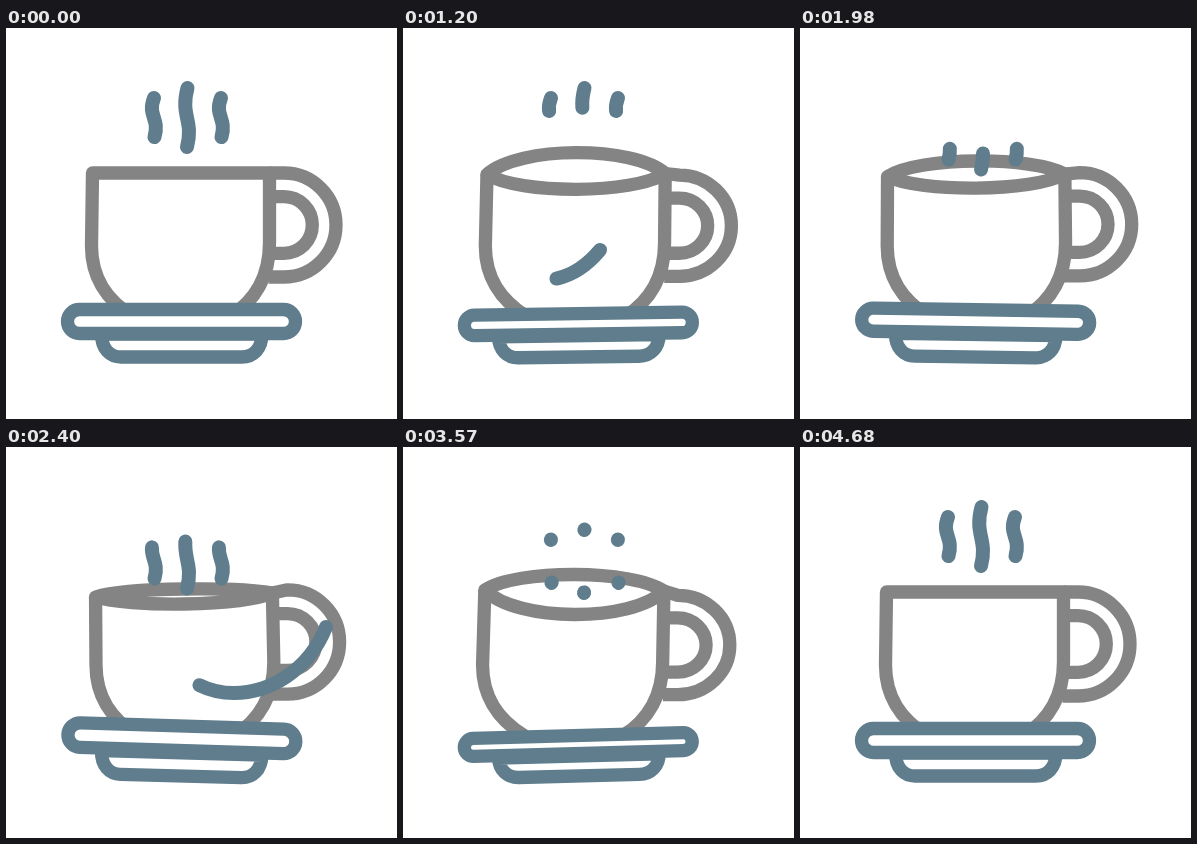
An HTML page with a canvas that plays this animation: 391 by 391 pixels, repeating every 4.8 s.

```html
<!DOCTYPE html>
<html lang="en">
<head>
<meta charset="utf-8">
<title>Coffee cup</title>
<style>
html, body { margin: 0; width: 100%; height: 100%; overflow: hidden; background: #fff; }
canvas { display: block; width: 391px; height: 391px; }
</style>
</head>
<body>
<canvas id="stage" width="391" height="391"></canvas>
<script>
const ctx = document.getElementById('stage').getContext('2d');
const LOOP = 4800, STEP = 30;
const GREY = '#848484', BLUE = '#5f7d8c';

// time, tilt (degrees), lift, saucer squeeze, rim left, rim right, rim back, rim front
const POSES = [
  [300, 0, 0, 0, 145, 145, 145, 145],
  [810, -1, 0.5, 3.5, 146, 145, 128.5, 157.5],
  [1620, -0.2, 0.5, 2.5, 147, 146, 125.5, 162.5],
  [2400, 1.8, -2, -0.5, 150, 146, 142, 157],
  [2880, 0, 0, 2, 148, 146, 135.5, 161.5],
  [3570, -1.6, 1, 6, 143, 144, 127.5, 167.5],
  [4600, 0, 0, 0, 145, 145, 145, 145]
];

function trimPath(d) {
  const el = document.createElementNS('http://www.w3.org/2000/svg', 'path');
  el.setAttribute('d', d);
  return { shape: new Path2D(d), length: el.getTotalLength() };
}

const steam = [
  'M148.500 109 C154 90 141 88 148 70',
  'M181 119 C188 92 174 88 181.500 60',
  'M215.500 109 C221 90 208 88 215 70'
].map(trimPath);

const swirls = [
  { d: 'M45 176 C47 222 84 252 140 252 C163 252 182 240 197 222', head: [510, 1000], tail: [825, 1390] },
  { d: 'M320 180 C302 225 262 246 228 246 C205 246 185 237 170 220', head: [2020, 2530], tail: [2430, 2985] },
  { d: 'M200 225 C150 262 60 245 27 165', head: [3700, 4200], tail: [4100, 4590] }
].map(s => ({ ...s, path: trimPath(s.d) }));

function ease(t, from, to) {
  const p = Math.min(1, Math.max(0, (t - from) / (to - from)));
  return p * p * (3 - 2 * p);
}

function poseAt(t) {
  const last = POSES.length - 1;
  if (t <= POSES[0][0]) return POSES[0];
  if (t >= POSES[last][0]) return POSES[last];
  const i = POSES.findIndex(p => p[0] > t) - 1;
  const a = POSES[i], b = POSES[i + 1], span = b[0] - a[0];
  const u = (t - a[0]) / span;
  const slope = (k, c) => k === 0 || k === last ? 0
    : (POSES[k + 1][c] - POSES[k - 1][c]) / (POSES[k + 1][0] - POSES[k - 1][0]);
  return a.map((v, c) => v * (1 + 2 * u) * (1 - u) ** 2 + b[c] * u * u * (3 - 2 * u)
    + span * (slope(i, c) * u * (1 - u) ** 2 - slope(i + 1, c) * u * u * (1 - u)));
}

// Strokes the part between two fractions; a started part is at least a dot.
function drawTrim({ shape, length }, start, end) {
  if (end <= 0 || start >= 1 || end <= start) return;
  const dot = 0.5;
  const from = Math.min(start * length, length - dot);
  ctx.setLineDash([Math.max(dot, end * length - from), 2 * length]);
  ctx.lineDashOffset = -from;
  ctx.stroke(shape);
  ctx.setLineDash([]);
}

function drawHandle(tilt, lift, squeeze, right) {
  const cx = 278 + tilt * 2, cy = 197 + lift, k = 1 - squeeze * 0.0075;
  const side = 263.5 + tilt * 1.6;
  for (const [r, y] of [[52, right], [28.3, cy - 28.3 * k]]) {
    ctx.beginPath();
    ctx.moveTo(side, y);
    ctx.lineTo(cx, cy - r * k);
    ctx.ellipse(cx, cy, r, r * k, 0, -Math.PI / 2, Math.PI / 2);
    ctx.lineTo(side - 1, cy + r * k);
    ctx.stroke();
  }
}

function drawCup([, tilt, lift, squeeze, left, right, back, front]) {
  ctx.strokeStyle = GREY;
  drawHandle(tilt, lift, squeeze, right);

  const lean = tilt * 2.4;
  const x0 = 86.5 + tilt * 1.6 - squeeze * 0.35;
  const x1 = 263.5 + tilt * 1.6;
  const low0 = 85.5 + lean - squeeze * 0.35;
  const low1 = 263.5 + lean;
  ctx.beginPath();
  ctx.moveTo(x0, left);
  ctx.lineTo(low0, 218);
  ctx.bezierCurveTo(low0, 250, low0 + 15, 272, low0 + 42, 289);
  ctx.moveTo(x1, right);
  ctx.lineTo(low1, 215);
  ctx.bezierCurveTo(low1, 248, low1 - 13, 272, low1 - 40, 289);
  ctx.stroke();

  const control = y => (y - (left + right) / 8) / 0.75;
  ctx.beginPath();
  ctx.moveTo(x0, left);
  ctx.bezierCurveTo(x0 + 32, control(back), x1 - 32, control(back), x1, right);
  ctx.bezierCurveTo(x1 - 32, control(front), x0 + 32, control(front), x0, left);
  ctx.closePath();
  ctx.stroke();
}

function tilted(angle, dy, paint) {
  ctx.save();
  ctx.translate(175.5, 305 + dy);
  ctx.rotate(angle * Math.PI / 180);
  ctx.translate(-175.5, -305);
  paint();
  ctx.restore();
}

function drawSaucer([, tilt, lift, squeeze]) {
  ctx.strokeStyle = BLUE;
  ctx.fillStyle = '#fff';

  tilted(tilt * 0.9, 0, () => {
    const brim = 306 + squeeze * 0.5;
    ctx.beginPath();
    ctx.moveTo(95.5, brim);
    ctx.bezierCurveTo(95.5, 321, 104, 329, 115, 329);
    ctx.lineTo(236, 329);
    ctx.bezierCurveTo(247, 329, 256, 321, 256, brim);
    ctx.closePath();
    ctx.stroke();
  });

  tilted(tilt, lift, () => {
    const top = 281.5 + squeeze;
    ctx.beginPath();
    ctx.roundRect(61.5, top, 228, 305.5 - top, (305.5 - top) / 2);
    ctx.fill();
    ctx.stroke();
  });
}

function drawSteam(start, end, drop) {
  ctx.save();
  ctx.translate(0, drop);
  steam.forEach(path => drawTrim(path, start, end));
  ctx.restore();
}

function draw(t) {
  ctx.fillStyle = '#fff';
  ctx.fillRect(0, 0, 391, 391);
  ctx.lineWidth = 13.3;
  ctx.lineJoin = 'round';
  ctx.lineCap = 'butt';

  const pose = poseAt(t);
  drawCup(pose);
  drawSaucer(pose);

  ctx.strokeStyle = BLUE;
  ctx.lineWidth = 14;
  ctx.lineCap = 'round';
  drawSteam(ease(t, 540, 1615), 1, 0);
  drawSteam(ease(t, 2460, 3600), ease(t, 1590, 2730), 22.5);
  drawSteam(0, ease(t, 3540, 4680), 27 * (1 - ease(t, 3540, 4600)));
  for (const s of swirls) drawTrim(s.path, ease(t, ...s.tail), ease(t, ...s.head));
}

function tick() {
  const t = performance.now() % LOOP;
  draw(Math.floor(t / STEP) * STEP);
  requestAnimationFrame(tick);
}
tick();
</script>
</body>
</html>
```
